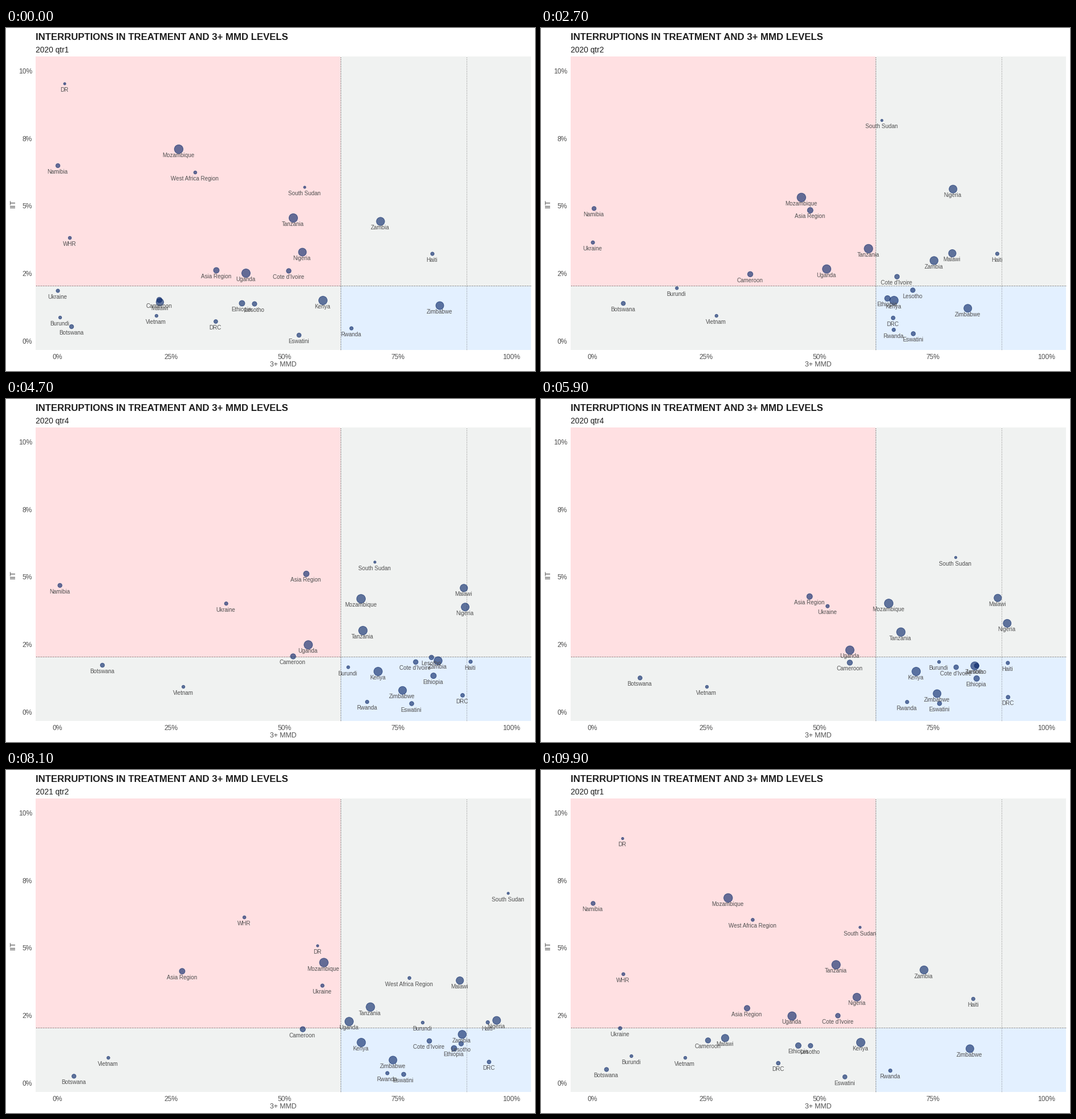
These frames come from a looping animation (928 by 603 pixels, 10000 ms). A matplotlib script:

```python
import math

import matplotlib.pyplot as plt
import numpy as np
from matplotlib.animation import FuncAnimation
from matplotlib.patches import Rectangle

W, H, DPI = 928, 603, 64
PT = 72 / DPI  # points per pixel

FRAMES, CYCLE, HOLD = 100, 17, 5
QUARTERS = [f"{2020 + q // 4} qtr{q % 4 + 1}" for q in range(6)]
LAST = len(QUARTERS) - 1
ROLLOUT = np.array([0, 0.25, 0.84, 0.92, 0.98, 1])  # typical pace of growth

PINK, GREY, BLUE = "#ffe0e2", "#f0f2f1", "#e3f0ff"
INK, SOFT, DOT = "#1c1c1c", "#505050", (0.02, 0.14, 0.4, 0.62)
LEFT, RIGHT, TOP, BOTTOM = 52, 920.5, 50, 566
SPLIT_X, GOAL_X, SPLIT_Y = 586.5, 807.5, 454

plt.rcParams["font.family"] = "Liberation Sans"
fig = plt.figure(figsize=(W / DPI, H / DPI), dpi=DPI, facecolor="white")
ax = fig.add_axes([0, 0, 1, 1])
ax.axis("off")


def write(x, y, text, size, color=SOFT, ha="center", **kw):
    return ax.text(x, y, text, fontsize=size * PT, color=color, ha=ha,
                   va=kw.pop("va", "baseline"), **kw)


def panel(x0, y0, x1, y1, color):
    ax.add_patch(Rectangle((x0, y0), x1 - x0, y1 - y0, fc=color, lw=0))


def dotted(xs, ys, color):
    xs, ys = np.broadcast_arrays(xs, ys)
    ax.plot(xs, ys, ",", color=color, zorder=2)


panel(LEFT, TOP, SPLIT_X, SPLIT_Y, PINK)
panel(SPLIT_X, TOP, RIGHT, SPLIT_Y, GREY)
panel(LEFT, SPLIT_Y, SPLIT_X, BOTTOM, GREY)
panel(SPLIT_X, SPLIT_Y, RIGHT, BOTTOM, BLUE)
across = np.arange(LEFT + 0.5, RIGHT, 3)
down = np.arange(TOP + 2.5, BOTTOM, 3)
dotted(across, SPLIT_Y, "#2a2a2a")
dotted(SPLIT_X, down, "#2a2a2a")
dotted(GOAL_X, down, "#7a7a7a")

write(52, 21, "INTERRUPTIONS IN TREATMENT AND 3+ MMD LEVELS", 16.78, INK,
      "left", weight="bold")
subtitle = write(52, 43, QUARTERS[0], 13.7, INK, "left")
for i, tick in enumerate(["10%", "8%", "5%", "2%", "0%"]):
    write(46, 79.8 + 118.75 * i, tick, 12, ha="right")
for i in range(5):
    write(90.5 + 199 * i, 582, f"{25 * i}%", 12)
write(486.5, 595, "3+ MMD", 12.2)
write(12.5, 308, "IIT", 13, rotation=90, va="center")

names, radii, paths = [], [], []


def spread(keys):
    """One value per quarter: two keys follow the rollout, others spread evenly."""
    if len(keys) == 2:
        return keys[0] + (keys[1] - keys[0]) * ROLLOUT
    return np.interp(range(LAST + 1), np.linspace(0, LAST, len(keys)), keys)


def track(name, radius, xs, ys, gone=()):
    path = np.column_stack([spread(xs), spread(ys)])
    path[list(gone)] = math.nan
    names.append(name)
    radii.append(radius)
    paths.append(path)


track("Mozambique", 7.7, [303, 330, 609, 628, 562, 556], [213, 315, 372, 332])
track("Tanzania", 7.6, [504, 640], [334, 402, 410, 418])
track("Uganda", 7.5, [421, 522, 535, 615], [431, 445, 398, 445, 432, 446])
track("Kenya", 7.5, [556, 592, 652, 653, 672, 605], [479])
track("Zambia", 7.2, [657, 619, 774, 752, 785, 806],
      [340, 368, 458, 461, 491, 455])
track("Nigeria", 7, [520, 646, 815, 802, 860, 861],
      [394, 255, 317, 384, 422, 447])
track("Zimbabwe", 7, [761, 796, 692, 697, 689, 675], [488, 490, 525, 507])
track("Malawi", 6.6, [270, 662, 793, 807, 786, 800],
      [482, 482, 293, 347, 357, 375])
track("Asia Region", 5, [369, 405, 553, 517, 349, 294],
      [426, 415, 207, 345, 353, 354])
track("Ethiopia", 5, [414, 788], [484, 470, 496, 488])
track("Cameroon", 4.7, [269, 370, 580, 509], [478, 413, 475, 452])
track("Cote d'Ivoire", 4.2, [496, 744], [427, 435, 478, 476])
track("Lesotho", 4.1, [436, 705, 770, 804], [485, 490, 426, 465, 479, 482])
track("Namibia", 3.7, [91, 95], [242, 336, 295, 340, 254, 167], gone=[4])
track("Botswana", 3.7, [115, 168, 116, 189, 133, 114],
      [525, 511, 452, 474, 534, 540])
track("Eswatini", 3.8, [514, 594, 724, 707, 678, 705], [540, 535])
track("DRC", 3.4, [368, 850], [516, 505, 530, 510])
track("Ukraine", 3.1, [91, 91, 91, 497, 518, 569], [462, 352, 364, 382])
track("Rwanda", 3.1, [606, 628, 674], [528, 533])
track("Haiti", 3.1, [748, 815, 815, 851], [397, 381, 416, 479, 424, 451])
track("Burundi", 2.7, [95, 127, 372, 686, 731, 731],
      [509, 451, 465, 474, 431, 449])
track("Vietnam", 2.7, [264, 322, 305, 155], [506])
track("WHR", 2.8, [112, 437], [369, 186, 268], gone=[1, 2, 3])
track("West Africa Region", 2.8, [332, 742, 614, 726], [254, 167, 456, 348],
      gone=[2, 3])
track("DR", 2.1, [103, 887, 505], [98, 195, 323], gone=[1, 2, 3])
track("South Sudan", 2.1, [524, 608, 586, 670, 881, 881],
      [280, 157, 169, 331, 139, 246])
paths[names.index("WHR")][4, 0] = 368

places = np.array(paths).transpose(1, 0, 2)
dots = ax.scatter(*places[0].T, s=(2 * PT * np.array(radii)) ** 2,
                  facecolors=[DOT], edgecolors=[DOT], linewidths=0.9 * PT,
                  zorder=3)
labels = [write(0, 0, name, 9.9, zorder=4) for name in names]
ax.set_xlim(0, W)
ax.set_ylim(H, 0)


def blend(a, b, t):
    # Whole quarters keep all their dots; dots missing at either end stay hidden.
    if t in (0, 1):
        return b if t else a
    return a + (b - a) * t


def draw(k):
    state, pos = divmod(k, CYCLE)
    follow = (state + 1) % len(QUARTERS)
    # The way back to the first quarter ends on the first frame of the next loop.
    span = FRAMES - LAST * CYCLE - HOLD if state == LAST else CYCLE - HOLD - 1
    step = max(0, pos - HOLD)

    xy = blend(places[state], places[follow], step / span)
    dots.set_offsets(xy)
    for label, (x, y) in zip(labels, xy):
        shown = not math.isnan(x)
        label.set_visible(shown)
        if shown:
            label.set_position((x - 0.7, y + 14))
    nearest = follow if step > math.ceil(span / 2) else state
    subtitle.set_text(QUARTERS[nearest])
    return [dots, subtitle, *labels]


anim = FuncAnimation(fig, draw, frames=FRAMES, interval=100, repeat=True,
                     repeat_delay=0, blit=False)
plt.show()
```
